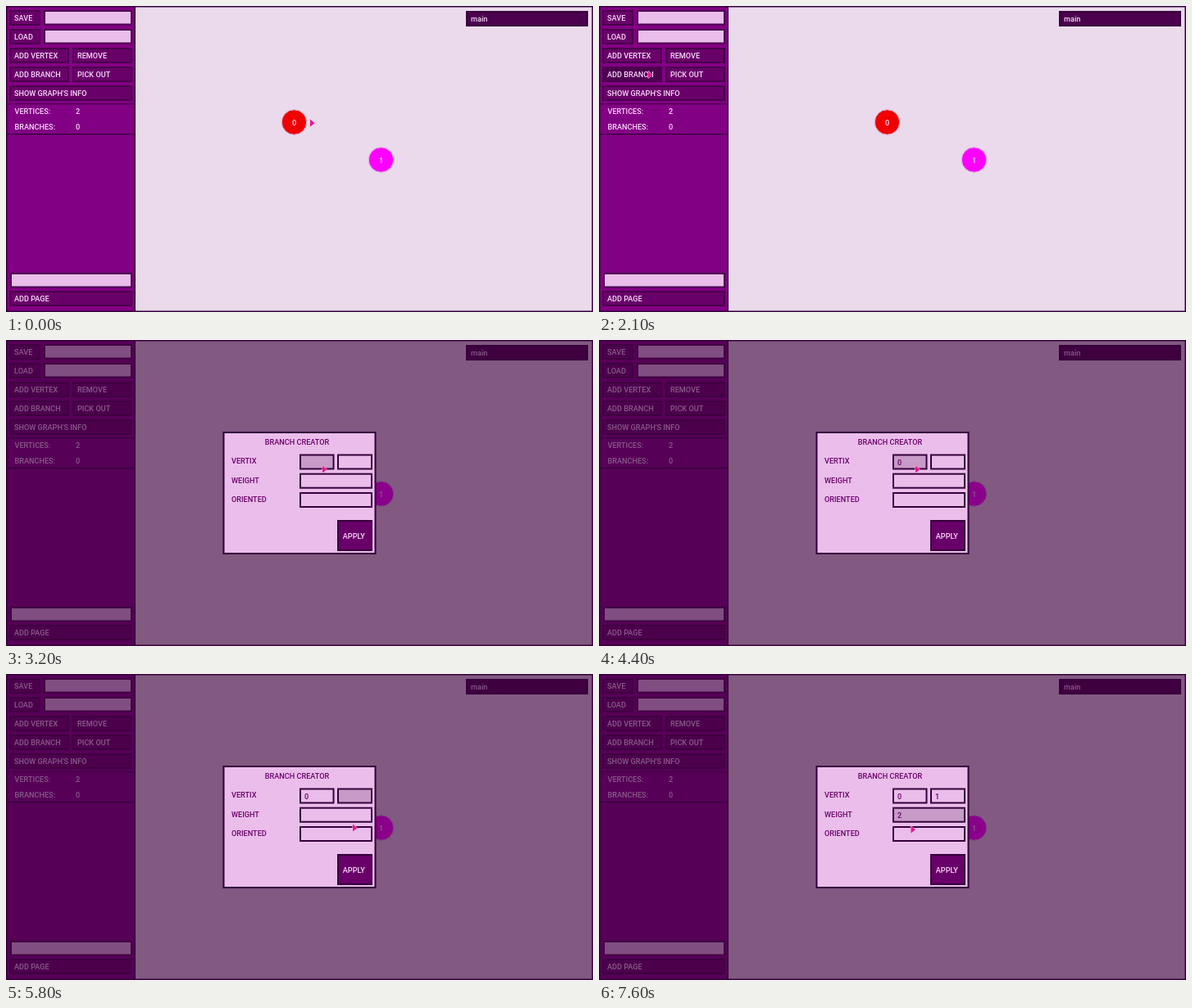
An HTML page with a canvas that plays this animation: 716 by 374 pixels, repeating every 8 s.

```html
<!DOCTYPE html>
<html lang="en">
<head>
<meta charset="utf-8">
<title>Graph editor</title>
<style>
html, body { margin: 0; width: 100%; height: 100%; overflow: hidden; }
canvas { display: block; }
</style>
</head>
<body>
<canvas id="stage" width="716" height="374"></canvas>
<script>
const ctx = document.getElementById('stage').getContext('2d');
const LOOP = 8000, TICK = 100;
const DARK = '#34003a', BUTTON = '#690069', HOVER = '#4d0050';
const INPUT = '#ebbdeb', ACTIVE = '#c79ac7', PALE = '#fbd9fb', INK = '#690069';

// Pointer stops: time, x, y
const pointerPath = [
  [0, 371, 143], [500, 371, 143], [700, 346, 151], [900, 346, 151],
  [1000, 327, 180.5], [1800, 60, 84], [2200, 60, 84], [2800, 386, 158],
  [4700, 386, 158], [5600, 422, 152], [5800, 423, 188], [6500, 391, 180],
  [6700, 391, 180], [6800, 389, 181], [6900, 389, 181], [7200, 380.5, 190],
  [LOOP, 380.5, 190]
];

function pointerAt(t) {
  const i = pointerPath.findIndex(stop => stop[0] > t);
  const [t0, x0, y0] = pointerPath[i - 1], [t1, x1, y1] = pointerPath[i];
  const p = (t - t0) / (t1 - t0), k = p * p * (3 - 2 * p);
  return [x0 + (x1 - x0) * k, y0 + (y1 - y0) * k];
}

function rect(x0, y0, x1, y1, color) {
  ctx.fillStyle = color;
  ctx.fillRect(x0, y0, x1 - x0, y1 - y0);
}

function box(x0, y0, x1, y1, fill, border = DARK, line = 2) {
  rect(x0, y0, x1, y1, border);
  rect(x0 + line, y0 + line, x1 - line, y1 - line, fill);
}

function text(label, x, middle, color = PALE, weight = 500, align = 'left') {
  ctx.font = `${weight} 9.15px Roboto, sans-serif`;
  ctx.textAlign = align;
  ctx.fillStyle = color;
  ctx.fillText(label, x, middle + 3.3);
}

function button(label, x0, y0, x1, fill = BUTTON) {
  box(x0, y0, x1, y0 + 19, fill, '#4a004c');
  text(label, x0 + 6, y0 + 9.7);
}

function vertex(label, x, y, color) {
  ctx.beginPath();
  ctx.arc(x, y, 15.2, 0, Math.PI * 2);
  ctx.fillStyle = color;
  ctx.fill();
  ctx.strokeStyle = '#d9b5dc';
  ctx.lineWidth = 1;
  ctx.stroke();
  text(label, x, y + 0.7, PALE, 500, 'center');
}

function drawEditor(t) {
  rect(0, 0, 716, 374, DARK);
  rect(158, 1.5, 714.5, 372.5, '#eadaeb');
  rect(1.5, 1.5, 156.5, 372.5, '#820084');

  button('SAVE', 4, 5, 42);
  button('LOAD', 4, 28, 42);
  button('ADD VERTEX', 4, 51, 77);
  button('REMOVE', 81, 51, 154);
  button('ADD BRANCH', 4, 74, 77, t >= 2100 && t < 3200 ? HOVER : BUTTON);
  button('PICK OUT', 81, 74, 154);
  button("SHOW GRAPH'S INFO", 4, 97, 154);
  button('ADD PAGE', 4, 348, 154);
  for (const [x, y] of [[46, 5], [46, 28], [5, 326]]) box(x, y, 154, y + 18.5, INPUT, '#4a004c');

  rect(0, 119, 157, 120.3, '#4a004c');
  rect(0, 156, 157, 157.3, DARK);
  text('VERTICES:', 10.5, 128.3);
  text('2', 85, 128.3);
  text('BRANCHES:', 10.5, 147.2);
  text('0', 85, 147.2);

  box(561, 6, 710, 25, '#4a004c', DARK, 1.5);
  text('main', 567, 16);
  vertex('0', 351.5, 142, '#f00000');
  vertex('1', 457.5, 188, '#ff00ff');
}

function field(x0, y0, x1, value, active) {
  box(x0, y0, x1, y0 + 19, active ? ACTIVE : INPUT);
  text(value, x0 + 6, y0 + 10, INK);
}

function drawDialog(t) {
  rect(0, 0, 716, 374, 'rgba(56, 0, 56, 0.59)');
  box(264.5, 112, 451.5, 262, INPUT);
  text('BRANCH CREATOR', 355, 125, INK, 500, 'center');
  text('VERTIX', 275, 148, INK);
  text('WEIGHT', 275, 171.3, INK);
  text('ORIENTED', 275, 194.6, INK);

  field(358, 139.5, 400.5, t >= 4400 ? '0' : '', t >= 3200 && t < 5500);
  field(404, 139.5, 447, t >= 6000 ? '1' : '', t >= 5500 && t < 6500);
  field(358, 162.7, 447, t >= 7600 ? '2' : '', t >= 6500);
  field(358, 186, 447, '', false);

  box(404, 220, 447, 258, BUTTON);
  text('APPLY', 424.3, 239.3, PALE, 500, 'center');
}

function drawPointer(x, y) {
  ctx.beginPath();
  ctx.moveTo(x, y - 4.5);
  ctx.lineTo(x + 5.5, y + 0.3);
  ctx.lineTo(x, y + 4.5);
  ctx.closePath();
  ctx.strokeStyle = '#f7c4e6';
  ctx.lineWidth = 1;
  ctx.stroke();
  ctx.fillStyle = '#ec1590';
  ctx.fill();
}

function draw(now) {
  const t = Math.floor(now % LOOP / TICK) * TICK;
  drawEditor(t);
  if (t >= 2200) drawDialog(t);
  drawPointer(...pointerAt(t));
  requestAnimationFrame(draw);
}
requestAnimationFrame(draw);
</script>
</body>
</html>
```
